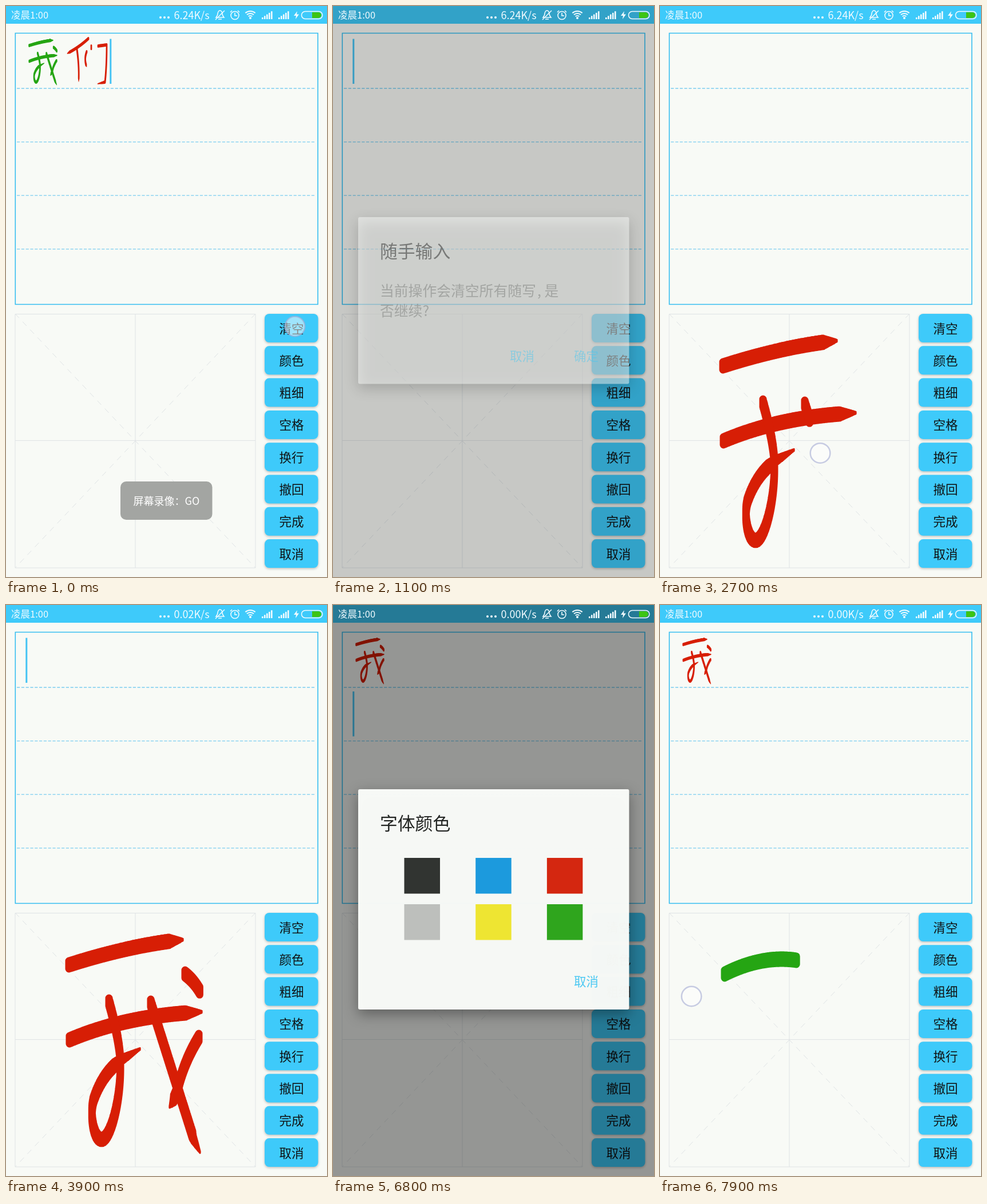
Animation of 561x998 px, one loop 8 s. Source, as an HTML page with a canvas:

```html
<!DOCTYPE html>
<html lang="zh-CN">
<head>
<meta charset="utf-8">
<style>
html, body { margin: 0; width: 100%; height: 100%; overflow: hidden; background: #f8faf6; }
canvas { display: block; }
svg { position: absolute; }
</style>
</head>
<body>
<canvas width="561" height="998"></canvas>
<svg width="0" height="0"><path/></svg>
<script>
const c = document.querySelector('canvas').getContext('2d');
const probe = document.querySelector('path');
const LOOP = 8000, STEP = 100, LAG = 85, SMALL = 0.21, ROW = 93.6;
const WRITE_START = 1520, STROKE_TIME = 380;
const BLUE = '#3ecafa', RED = '#d71e05', GREEN = '#25a513', LINK = '#45c6f3', GREY = '#777977';
const clamp = v => Math.max(0, Math.min(1, v));

// Samples a path evenly; the pen thins out over the last part.
function stroke(d, taper = .12) {
  probe.setAttribute('d', d);
  const length = probe.getTotalLength(), n = 160;
  return Array.from({ length: n }, (_, i) => {
    const k = i / (n - 1), { x, y } = probe.getPointAtLength(k * length);
    return { x, y, size: Math.min(1, .25 + .75 * (1 - k) / taper) };
  });
}

const WO = [
  'M110 629Q200 600 284 588L309 585',
  'M111 760Q200 722 315 713L342 711',
  'M180 694Q200 765 200 805C200 870 182 934 167 934C153 934 146 890 153 865Q168 820 200 796L234 776',
  'M253 696L328 933L339 956',
  'M337 756Q313 795 302 838Q297 858 286 877',
  'M313 645Q330 658 341 679'
].map(d => stroke(d));
const MEN = [
  'M144 57Q128 72 107 83',
  'M124 76Q128 104 127 132',
  'M149 70V75',
  'M141 80Q136 93 141 106',
  'M161 70L176 68Q176 105 173 133L160 136'
].map(d => stroke(d));
const ARC = stroke('M113 645Q178 612 239 621', .001);

const TAPS = [
  { from: 0, to: 100, x: 505, y: 560 },
  { from: 700, to: 1000, x: 445, y: 618 },
  { from: 5200, to: 5500, x: 499, y: 788 },
  { from: 6400, to: 6700, x: 499, y: 620 },
  { from: 7100, to: 7300, x: 405, y: 554 },
  { from: 7900, to: 8000, x: 55, y: 684 }
];

function text(str, x, y, size, color, align = 'left') {
  c.font = `${size}px "Noto Sans CJK SC", "Noto Sans CJK", sans-serif`;
  c.fillStyle = color;
  c.textAlign = align;
  c.fillText(str, x, y);
}

function box(x, y, w, h, r, color) {
  c.fillStyle = color;
  c.beginPath();
  c.roundRect(x, y, w, h, r);
  c.fill();
}

function outline(d, color, width, dash = []) {
  c.strokeStyle = color;
  c.lineWidth = width;
  c.setLineDash(dash);
  c.stroke(new Path2D(d));
  c.setLineDash([]);
}

function shadow(blur, dy, alpha) {
  c.shadowColor = `rgba(0,0,0,${alpha})`;
  c.shadowBlur = blur;
  c.shadowOffsetY = dy;
}

function ink(points, color, part = 1, pen = 1) {
  c.fillStyle = color;
  c.beginPath();
  for (const { x, y, size } of points.slice(0, Math.round(points.length * clamp(part)))) {
    const w = 13 * size * pen, h = 27 * size * pen;
    c.roundRect(x - w / 2, y - h / 2, w, h, w / 2);
  }
  c.fill();
}

function smallWo(color) {
  c.save();
  c.transform(SMALL, 0, 0, SMALL, 17.5, -63);
  WO.forEach(s => ink(s, color));
  c.restore();
}

function page() {
  c.fillStyle = '#f8faf6';
  c.fillRect(0, 0, 561, 998);
  c.fillStyle = BLUE;
  c.fillRect(0, 0, 561, 31);

  outline('M16.3 47.5H545V521.5H16.3Z', '#35bdf0', 1.6);
  for (let i = 0; i < 4; i++) outline(`M19 ${144 + i * ROW}H541`, '#7ccdf0', 1.3, [5.2, 2.6]);

  const pale = '#dfe3e5';
  outline('M16 538.5H436V982H16ZM226 538V982M16 759.5H436', pale, 1);
  outline('M16 538L436 982M436 538L16 982', pale, 1, [10, 9]);

  ['清空', '颜色', '粗细', '空格', '换行', '撤回', '完成', '取消'].forEach((label, i) => {
    const y = 538 + i * 56.3;
    c.save();
    shadow(4, 1.5, .25);
    box(452, y, 93.5, 50, 8, BLUE);
    c.restore();
    text(label, 499, y + 33.5, 21.5, '#101314', 'center');
  });
}

function caret(t) {
  const blink = phase => (t + phase) % 1000 < 500;
  const [on, x, row] =
    t < 1000 ? [t < 200, 183, 0] :
    t < 4500 ? [blink(100), 36, 0] :
    t < 5400 ? [t < 5000, 97, 0] : [blink(600), 36, 1];
  if (on) box(x - 1.7, 57.5 + row * ROW, 3, 78.5, 0, '#45c3f3');
}

function writing(t) {
  if (t < 1000) {
    smallWo(GREEN);
    MEN.forEach(s => ink(s, RED, 1, SMALL));
  } else if (t < 4500) {
    WO.forEach((s, i) => ink(s, RED, (t - WRITE_START) / STROKE_TIME - i));
  } else {
    smallWo(RED);
    ink(ARC, GREEN, (t - 7600) / 280);
  }
}

function dialog(t, from, to, y, h, title, content) {
  const k = clamp(Math.min(t - from, to - t) / 300);
  if (!k) return;
  c.fillStyle = `rgba(0,0,0,${.6 * k})`;
  c.fillRect(0, 0, 561, 998);
  c.save();
  c.globalAlpha = Math.min(1, k * 1.45);
  c.save();
  shadow(24, 8, .38);
  box(44, y, 473.5, h, 3, '#fbfdfa');
  c.restore();
  text(title, 82, y + 71, 30.8, '#1c1e1c');
  content();
  c.restore();
}

function clearPrompt() {
  text('当前操作会清空所有随写', 82, 506.5, 24.8, GREY);
  text(', 是', 357, 506.5, 24.8, GREY);
  text('否继续?', 82, 542, 24.8, GREY);
  text('取消', 309, 620, 21.5, LINK);
  text('确定', 421, 620, 21.5, LINK);
}

function palette() {
  ['#2b2e2b', '#1597dc', '#d32109', '#bbbdba', '#eee52c', '#29a316'].forEach((color, i) =>
    box(124.5 + i % 3 * 124.7, i < 3 ? 442 : 523, 62.5, 62.5, 0, color));
  text('取消', 421, 666, 21.5, LINK);
}

function dot(x, y, r) {
  c.beginPath();
  c.arc(x, y, r, 0, 2 * Math.PI);
  c.fill();
}

function statusBar(t) {
  const white = '#f2fbff';
  text('凌晨1:00', 9, 22, 16.5, white);
  text(t < 2900 ? '6.24K/s' : t < 5900 ? '0.02K/s' : '0.00K/s', 293.5, 22.5, 18, white);
  for (let i = 0; i < 3; i++) dot(270 + i * 7, 20, 2);

  // muted bell, then alarm clock
  outline('M367 20Q370 17 370 13Q371 8 374 8Q377 8 378 13Q378 17 381 20ZM371 23H377M366 24L382 8', white, 1.5);
  outline('M393 16.5a7 7 0 1 0 14 0a7 7 0 1 0 -14 0M400 12V17H404M392 11L395 8M405 8L408 11', white, 1.6);
  // wifi
  for (let r = 5; r < 14; r += 4) {
    c.beginPath();
    c.arc(427, 22, r, -2.3, -.84);
    c.lineWidth = 2;
    c.stroke();
  }
  dot(427, 21, 2);
  // signal bars
  for (let i = 0; i < 10; i++) {
    const step = i % 5;
    c.fillRect((i < 5 ? 447 : 476) + step * 4, 20 - step * 2.7, 2.6, 3 + step * 2.7);
  }
  // charge bolt and battery
  c.fill(new Path2D('M509 9L503 17H507L506 23L512 14.5H508Z'));
  box(535, 11, 16, 10, [0, 5, 5, 0], '#3cc414');
  outline('M523 9.5H546.5a6.5 6.5 0 0 1 0 13H523a6.5 6.5 0 0 1 0 -13Z', white, 1.5);
}

function toast(t) {
  c.save();
  c.globalAlpha = clamp(1 - t / 300);
  box(200, 831, 160.5, 67, 10, '#a3a5a2');
  text('屏幕录像：GO', 280.5, 872, 18, '#fff', 'center');
  c.restore();
}

function finger({ x, y }) {
  c.fillStyle = 'rgba(255,255,255,.5)';
  dot(x, y, 17.3);
  c.lineWidth = 2.5;
  c.strokeStyle = 'rgba(165,172,212,.6)';
  c.stroke();
}

function fingers(t) {
  TAPS.filter(tap => t >= tap.from && t < tap.to).forEach(finger);
  const trace = (points, k) => {
    if (k >= 0 && k < 1) finger(points[Math.floor(k * points.length)]);
  };
  WO.forEach((s, i) => trace(s, (t + LAG - WRITE_START) / STROKE_TIME - i));
  trace(ARC, (t + LAG - 7600) / 280);
}

function frame(now) {
  const t = Math.floor(now % LOOP / STEP) * STEP;
  page();
  writing(t);
  caret(t);
  dialog(t, 0, 1200, 369, 291.5, '随手输入', clearPrompt);
  dialog(t, 6600, 7500, 322, 385, '字体颜色', palette);
  statusBar(t);
  toast(t);
  fingers(t);
  requestAnimationFrame(frame);
}
requestAnimationFrame(frame);
</script>
</body>
</html>
```
